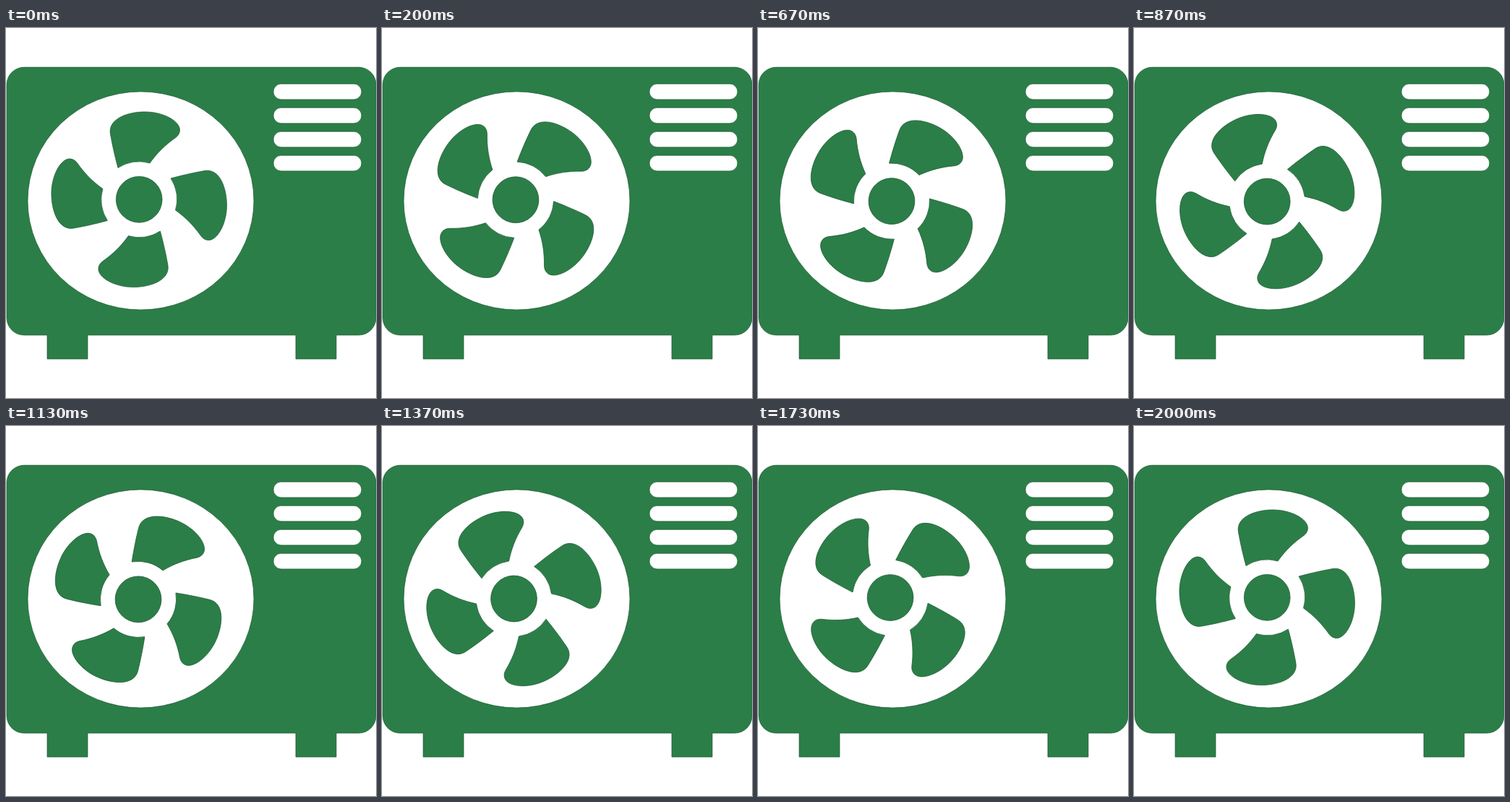
These frames come from a looping animation (512x512 px, 2.06 s). An HTML page:

```html
<!DOCTYPE html>
<html lang="en">
<head>
<meta charset="utf-8">
<title>Air conditioner fan</title>
<style>
  html, body { margin: 0; height: 100%; overflow: hidden; background: #fff; }
  svg { display: block; width: 100vw; height: 100vh; }
  .green { fill: #2b7e47; stroke: #1b5a31; stroke-width: .7; }
  .hole { fill: #fff; stroke: #1b5a31; stroke-width: .7; }
</style>
</head>
<body>
<svg viewBox="0 0 512 512">
  <defs>
    <path id="blade" d="M155 193.5C150 175 147 161 144.5 147C140.5 126 168 116 192 116
      C218 116 240.5 129 240.5 141C240.5 146 238 149 235 151.5C220 162 209 173 199 187
      A52.6 52.6 0 0 0 155 193.5Z"/>
    <rect id="slot" x="370" y="77.3" width="122" height="21.6" rx="10.8"/>
  </defs>
  <path class="green" d="M25 54.3H488a24 24 0 0 1 24 24V401a24 24 0 0 1-24 24H457V458H401V425
    H113V458H57V425H25a24 24 0 0 1-24-24V78.3a24 24 0 0 1 24-24Z"/>
  <g class="hole">
    <ellipse cx="186.5" cy="239" rx="156.5" ry="151"/>
    <use href="#slot"/>
    <use href="#slot" y="33"/>
    <use href="#slot" y="66"/>
    <use href="#slot" y="99"/>
  </g>
  <g id="fan" class="green">
    <circle cx="184.2" cy="237.3" r="31.9"/>
    <use href="#blade"/>
    <use href="#blade" transform="rotate(90 184.2 237.3)"/>
    <use href="#blade" transform="rotate(180 184.2 237.3)"/>
    <use href="#blade" transform="rotate(270 184.2 237.3)"/>
  </g>
</svg>
<script>
  const LOOP = 2060, STEPS = 60, STEP_ANGLE = 6;
  const fan = document.getElementById('fan');

  // 30 steps per second, each start rounded to 10 ms; the last pose is held
  const stepAt = ms => Math.min(STEPS, Math.floor((Math.floor(ms / 10) + .5) * .3));

  function draw() {
    const angle = stepAt(performance.now() % LOOP) * STEP_ANGLE;
    // The pivot sits slightly off the hub, so the fan wobbles
    fan.setAttribute('transform', `rotate(${angle} 183.9 238.7)`);
    requestAnimationFrame(draw);
  }
  draw();
</script>
</body>
</html>
```
